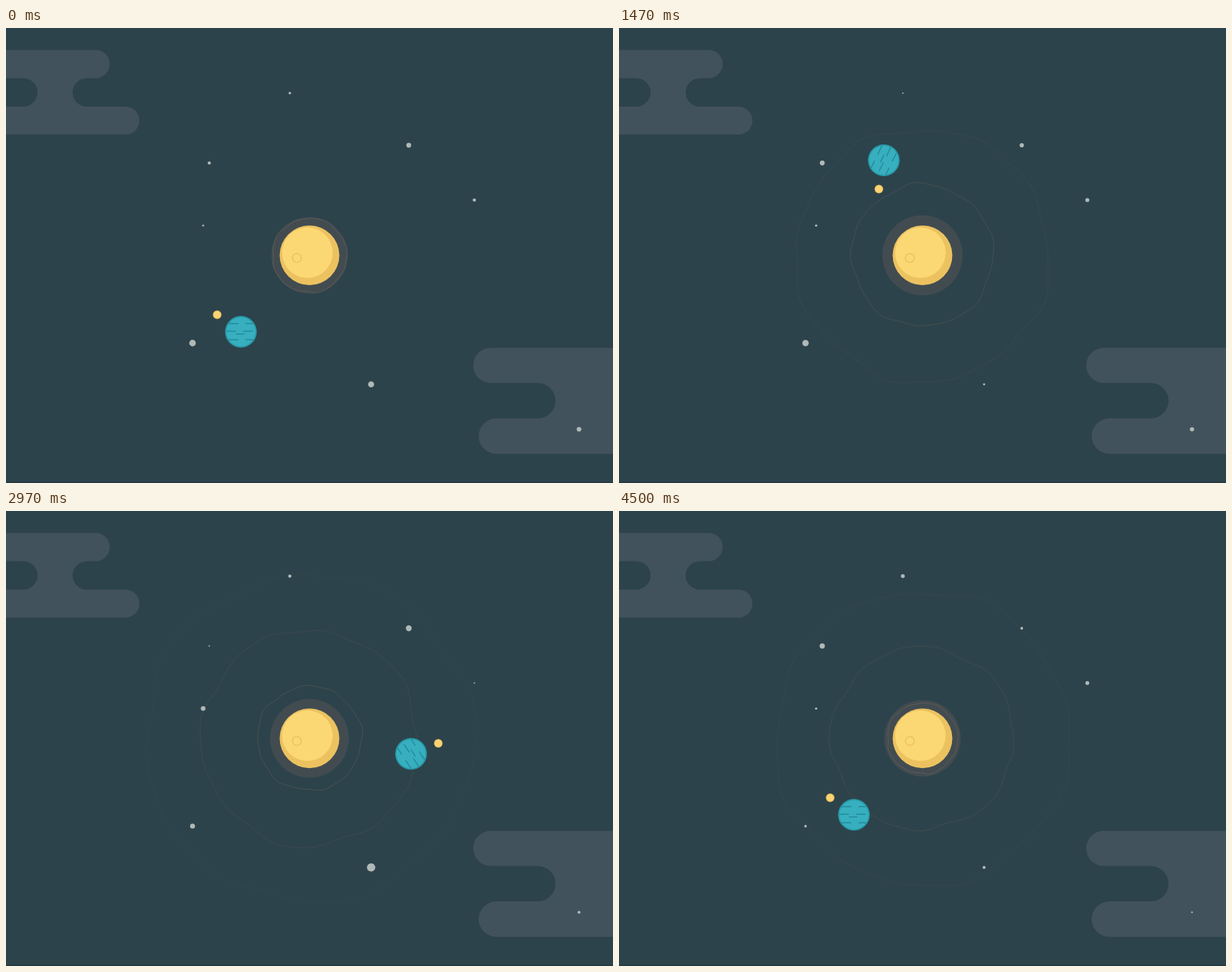
An HTML page with a canvas for the animation above (4530 ms loop, 864 by 648 pixels).

```html
<!DOCTYPE html>
<html lang="en">
<head>
<meta charset="utf-8">
<title>Orbit</title>
<style>
html, body { margin: 0; width: 100%; height: 100%; overflow: hidden; background: #2d434b; }
canvas { display: block; }
</style>
</head>
<body>
<canvas id="stage" width="864" height="648"></canvas>
<script>
const ctx = document.getElementById('stage').getContext('2d');
const LOOP = 4530, STEP = 30, TURN = 4470, RIPPLE_GAP = 900;
const SUN = { x: 432, y: 323.8 };
const TAU = 2 * Math.PI, RAD = Math.PI / 180;

const clouds = new Path2D(
  'M0 31.2H127.5a20.15 20.15 0 0 1 0 40.3H115a20.25 20.25 0 0 0 0 40.5H170' +
  'a19.9 19.9 0 0 1 0 39.8H0V112H24.7a20.25 20.25 0 0 0 0-40.5H0z' +
  'M864 455.5H690a25 25 0 0 0 0 50H757a25.25 25.25 0 0 1 0 50.5H698a25.25 25.25 0 0 0 0 50.5H864z');

const stars = [
  { x: 404, y: 92.7, size: 2.9, peak: 4000, period: 5500 },
  { x: 573.3, y: 167, size: 5.7, peak: 680, period: 2800 },
  { x: 289.3, y: 192.2, size: 3.8, peak: 1000, period: 3700 },
  { x: 666.6, y: 245, size: 3.2, peak: 900, period: 4200 },
  { x: 280.6, y: 281.3, size: 3.3, peak: 2950, period: 4700 },
  { x: 265.5, y: 448.8, size: 4.7, peak: 1360, period: 1330 },
  { x: 519.7, y: 507.6, size: 6, peak: 2880, period: 2400 },
  { x: 815.6, y: 571.5, size: 3.3, peak: 400, period: 10000 }
];

// Cosine swing between low and high, reaching high at time peak.
function pulse(t, low, high, peak, period) {
  return low + (high - low) * (0.5 + 0.5 * Math.cos(TAU * (t - peak) / period));
}

function disc(x, y, r, fill) {
  ctx.beginPath();
  ctx.arc(x, y, r, 0, TAU);
  ctx.fillStyle = fill;
  ctx.fill();
}

function stroke(color, width) {
  ctx.strokeStyle = color;
  ctx.lineWidth = width;
  ctx.stroke();
}

// A wavering outline that changes shape and fades as it grows.
function ripple(size) {
  ctx.beginPath();
  for (let deg = 0; deg < 360; deg += 3) {
    const a = deg * RAD;
    const wobble = 0.016 * Math.sin(5 * a + size / 30) +
      0.012 * Math.sin(8 * a - size / 25) + 0.008 * Math.sin(13 * a + size / 20);
    const r = size * (1 + wobble);
    ctx.lineTo(SUN.x + r * Math.cos(a), SUN.y + r * Math.sin(a));
  }
  ctx.closePath();
  ctx.globalAlpha = 0.26 * (1 - size / 300) ** 1.6;
  stroke('#d99a6c', 1);
  ctx.globalAlpha = 1;
}

function drawSun(t) {
  disc(SUN.x, SUN.y, pulse(t, 54.2, 57.4, 1900, TURN), '#424c50');
  for (let age = t; age > -RIPPLE_GAP; age -= RIPPLE_GAP) {
    const size = 53 + 0.0885 * age;
    if (size > 0 && size < 300) ripple(size);
  }
  disc(SUN.x, SUN.y, 42.5, '#ecc260');
  disc(429, 320, 36, '#fbd874');
  ctx.beginPath();
  ctx.arc(414, 327.5, 6.3, 0, TAU);
  stroke('#ecc260', 1.6);
}

function drawPlanet(t) {
  const turn = 360 * t / TURN;
  const orbit = (131.9 + turn) * RAD, moon = (215.7 - turn) * RAD;
  ctx.save();
  ctx.translate(SUN.x + 146.2 * Math.cos(orbit), SUN.y + 146.2 * Math.sin(orbit));
  const mx = 41.6 * Math.cos(moon), my = 41.6 * Math.sin(moon);
  disc(mx, my, 6.1, '#e9bb5f');
  disc(mx, my, 5, '#fbd472');
  ctx.rotate(turn * RAD);
  disc(0, 0, 22.6, '#2797a6');
  disc(0, 0, 20.8, '#37afbf');
  ctx.setLineDash([14, 10]);
  ctx.beginPath();
  for (const y of [-11.5, -0.8, 11.5]) {
    const half = Math.sqrt(21 ** 2 - y ** 2);
    ctx.moveTo(-half, y);
    ctx.lineTo(half, y);
  }
  ctx.moveTo(-7, 3.2);
  ctx.lineTo(5, 3.2);
  stroke('#238b9a', 1.5);
  ctx.restore();
}

function draw(now) {
  // The first pose is held for one extra step.
  const t = Math.max(0, Math.floor(now % LOOP / STEP) - 1) * STEP;
  ctx.fillStyle = '#2d434b';
  ctx.fillRect(0, 0, 864, 648);
  ctx.fillStyle = '#42525c';
  ctx.fill(clouds);
  ctx.fillStyle = '#263a42';
  ctx.fillRect(0, 646, 864, 2);
  for (const { x, y, size, peak, period } of stars) {
    disc(x, y, pulse(t, 1, size, peak, period), '#b0b9b7');
  }
  drawSun(t);
  drawPlanet(t);
}

const start = performance.now();
function frame() {
  draw(performance.now() - start);
  requestAnimationFrame(frame);
}
frame();
</script>
</body>
</html>
```
